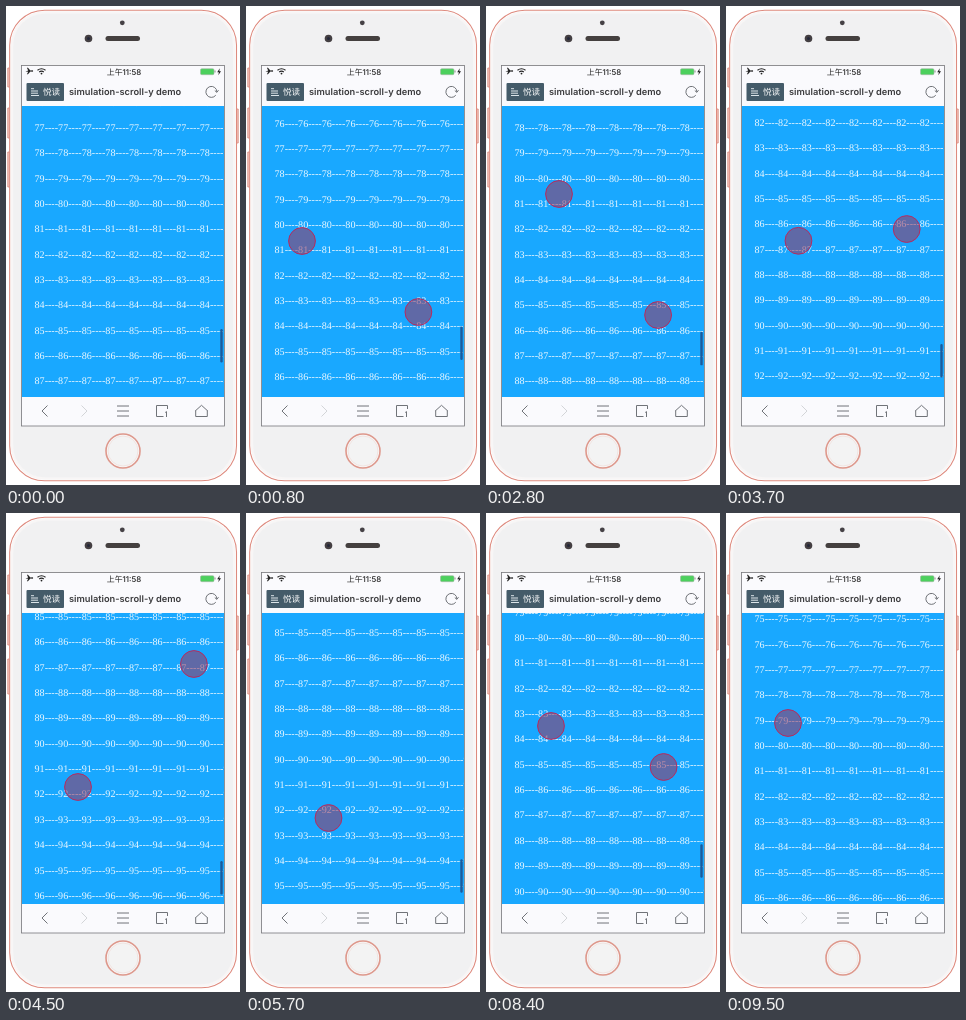
Animation of 234 by 479 pixels, one loop 9.7 s. Source, as an HTML page:

```html
<!DOCTYPE html>
<html lang="zh">
<head>
<meta charset="utf-8">
<style>
html, body { margin: 0; width: 100%; height: 100%; overflow: hidden; background: #fff; }
svg { display: block; text-rendering: geometricPrecision; }
.rows { font: 10.13px "Liberation Serif", serif; fill: #fff; fill-opacity: .92; }
.ui { font-family: Inter, "Noto Sans CJK SC", "Noto Sans CJK", sans-serif; }
.icon { fill: none; stroke: #707378; stroke-width: 1; }
</style>
</head>
<body>
<svg width="234" height="479" viewBox="0 0 234 479">
  <defs><clipPath id="page"><path d="M16 100H218V391H16Z"/></clipPath></defs>

  <!-- phone body -->
  <g fill="#f3c6be" stroke="#d98679" stroke-width=".8">
    <path d="M3.5 62H1.8V81H3.5M3.5 102H1.8V132H3.5M3.5 146H1.8V181H3.5M230.5 103H232.2V137H230.5"/>
    <rect x="3.7" y="4.2" width="226.8" height="470.6" rx="35" fill="#fff" stroke="#de8a7e" stroke-width="1.1"/>
    <rect x="6" y="6.5" width="222.2" height="466" rx="33" fill="#f1f1f2" stroke="#f8f6f6" stroke-width="2.5"/>
  </g>
  <circle cx="116.3" cy="16.8" r="2.4" fill="#454145"/>
  <circle cx="82.5" cy="32.5" r="3.8" fill="#443f42"/>
  <circle cx="82.5" cy="32.5" r="1.5" fill="#25283a"/>
  <rect x="99.5" y="30" width="34.5" height="5" rx="2.5" fill="#45403f"/>
  <circle cx="117" cy="445" r="17" fill="#f7f6f6" stroke="#de988c" stroke-width="1.6"/>
  <circle cx="117" cy="445" r="15" fill="#f3f3f3" stroke="#eed8d3" stroke-width=".6"/>
  <rect x="15.5" y="59.5" width="203" height="360.5" fill="#fafafd" stroke="#77777b" stroke-width=".8"/>

  <!-- status bar -->
  <g class="ui" fill="#222">
    <path d="M19.5 65.5l2.7-.9-1.3-2.8h1l2.5 2.6 2.3-.2q1 .9 0 1.5l-2.3-.1-2.5 2.6h-1l1.3-2.5z"/>
    <g fill="none" stroke="#222" stroke-width="1.1"><path d="M31.5 64.3q4-3.2 8 0M33.2 66q2.3-1.8 4.6 0"/></g>
    <circle cx="35.5" cy="67.6" r=".9"/>
    <text x="118" y="68.6" font-size="7.9" font-weight="500" text-anchor="middle">上午11:58</text>
    <rect x="194.5" y="62.7" width="13.5" height="6" rx="1.3" fill="#4cd05d" stroke="#a3b5a5" stroke-width=".6"/>
    <path d="M209 64.5v2" stroke="#888"/>
    <path d="M213.8 62.3l-2.6 4h1.7l-.6 3 2.7-4h-1.7z"/>
  </g>

  <!-- title bar -->
  <g class="ui">
    <rect x="20.5" y="77" width="37.5" height="18" rx="1" fill="#445b69"/>
    <path d="M25 82.7h3M25 85h7M25 87.2h7M25 89.5h8" stroke="#dce4e8" stroke-width="1"/>
    <text x="37" y="89.4" font-size="8.6" fill="#fff">悦读</text>
    <text x="63" y="89.4" font-size="9.25" font-weight="600" fill="#3a3a3c">simulation-scroll-y demo</text>
    <path class="icon" d="M209.8 89.2A5.5 5.5 0 1 1 210.9 86M208.8 84.6l2.1 1.8 1.6-2.2"/>
  </g>

  <!-- page -->
  <g clip-path="url(#page)">
    <path d="M16 99H218V391H16Z" fill="#19a8ff"/>
    <g class="rows" id="rows"></g>
    <rect id="thumb" x="214.3" width="2.4" height="33.5" rx="1.2" fill="#1c5c9c"/>
  </g>
  <g fill="#983a62" fill-opacity=".57" stroke="#b42c60" stroke-width="1">
    <circle id="left" r="13.4"/>
    <circle id="right" r="13.4"/>
  </g>

  <!-- tool bar -->
  <g class="icon">
    <path d="M41.5 399.5l-5.5 5.5 5.5 5.5M111 400h12M111 405h12M111 410h12"/>
    <path d="M75.5 399.5l5.5 5.5-5.5 5.5" stroke="#d3d5d8"/>
    <path d="M161.5 403V399.5H150.5V410.5H157.5M189.7 404.5V410.5H201.3V404.5M189.2 405L195.5 399.3 201.8 405"/>
    <path d="M159.2 406.5l1.3-.9V411"/>
  </g>
</svg>
<script>
const LOOP = 9.7, STEP = .1, PITCH = 25.35;
const byId = id => document.getElementById(id);
const rows = byId('rows'), thumb = byId('thumb');

// Seconds at which the hands turn, and the pose at each
const stops = [0, .8, 2.8, 4.5, 6.9, 8.4, 9.5];
const scrollY = [198, 219, 172.5, -22.7, 9, 125, 233];
const leftX = [56, 56, 73, 72, 93, 65, 62];
const leftY = [214, 235, 188, 274, 336, 213, 210];
const rightY = [285, 306, 309, 151, 120, 254, 362];

function at(values, t) {
  const i = Math.max(1, stops.findIndex(s => s >= t));
  if (t >= stops.at(-1)) return values.at(-1);
  const u = (t - stops[i - 1]) / (stops[i] - stops[i - 1]);
  return values[i - 1] + (values[i] - values[i - 1]) * u * u * (3 - 2 * u);
}

function place(id, cx, cy, pressed) {
  const dot = byId(id);
  dot.setAttribute('cx', cx);
  dot.setAttribute('cy', cy);
  dot.style.opacity = +pressed;
}

for (let n = 70; n <= 100; n++) {
  const text = document.createElementNS('http://www.w3.org/2000/svg', 'text');
  text.setAttribute('x', 28.5);
  text.setAttribute('y', (n - 80) * PITCH + 3);
  text.textContent = `${n}----`.repeat(9);
  rows.append(text);
}

function draw(now) {
  const t = Math.floor(now / 1000 % LOOP / STEP + 1e-6) * STEP;
  const y = at(scrollY, t), reach = at(rightY, t);
  rows.setAttribute('transform', `translate(0 ${y})`);
  thumb.setAttribute('y', 345.4 - y * .1134);
  thumb.style.opacity = +(t < 9.35);
  place('left', at(leftX, t), at(leftY, t), t > .25 && t < 9.55);
  // The right hand swings on an arc and lifts once mid-way
  place('right', 203 - reach / 10, reach, t > .25 && t < 9.15 && Math.abs(t - 6.6) > .9);
  requestAnimationFrame(draw);
}
requestAnimationFrame(draw);
</script>
</body>
</html>
```
